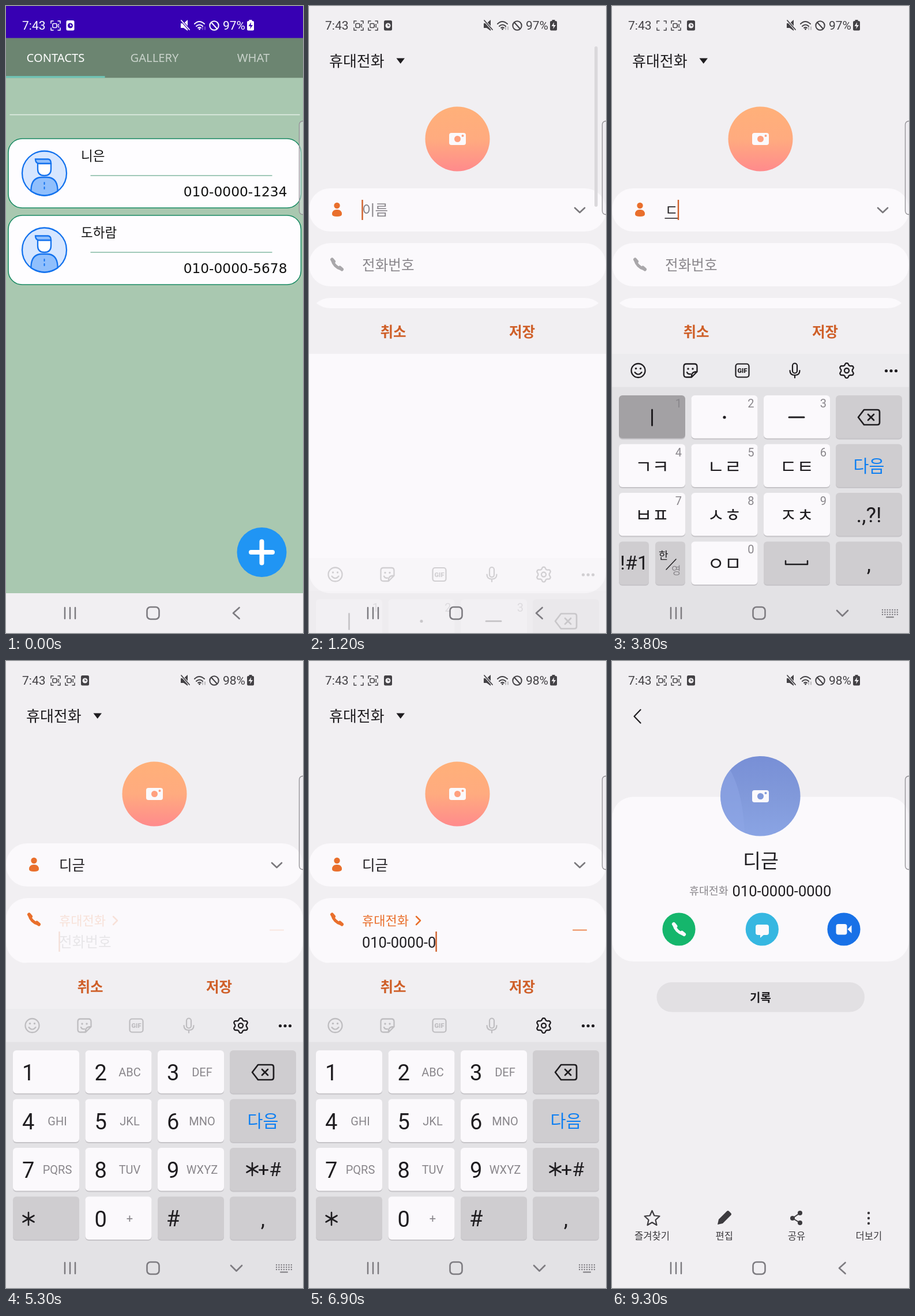
An HTML page for the animation above (9.4 s loop, 515 by 1087 pixels).

```html
<!DOCTYPE html>
<html lang="ko">
<head>
<meta charset="utf-8">
<title>Add a contact</title>
<style>
html, body { margin: 0; width: 100%; height: 100%; overflow: hidden; background: #f1eff2; }
svg { display: block; width: 515px; height: 1087px; }
text { font-family: Roboto, "Noto Sans CJK KR", "Noto Sans CJK", sans-serif; white-space: pre; }
.wide { font-family: "Noto Sans", "Noto Sans CJK KR", sans-serif; }
.round { font-family: "DejaVu Sans", sans-serif; }
.line { fill: none; stroke-linecap: round; stroke-linejoin: round; }
</style>
</head>
<body>
<svg id="stage" viewBox="0 0 515 1087"></svg>
<script>
const LOOP = 9400, STEP = 100;
const INK = '#1f1d20', GREY = '#89868b', PAPER = '#f1eff2', CARD = '#fbf9fc', ORANGE = '#e96f2c', RUST = '#cf5f28';
const NUMBER = '010-0000-0000';

// Drawing helpers
const text = (x, y, size, str, fill = INK, more = '') => `<text x="${x}" y="${y}" font-size="${size}" fill="${fill}" ${more}>${str}</text>`;
const mid = (x, y, size, str, fill, more = '') => text(x, y, size, str, fill, 'text-anchor="middle" ' + more);
const rect = (x, y, w, h, r, fill, more = '') => `<rect x="${x}" y="${y}" width="${w}" height="${h}" rx="${r}" fill="${fill}" ${more}/>`;
const circle = (x, y, r, fill, more = '') => `<circle cx="${x}" cy="${y}" r="${r}" fill="${fill}" ${more}/>`;
const line = (d, color = INK, w = 2.5, more = '') => `<path class="line" d="${d}" stroke="${color}" stroke-width="${w}" ${more}/>`;
const shape = (d, fill, more = '') => `<path d="${d}" fill="${fill}" ${more}/>`;
const group = (id, body, more = '') => `<g id="${id}" ${more}>${body}</g>`;
const at = (x, y, body) => `<g transform="translate(${x} ${y})">${body}</g>`;
const bold = 'font-weight="500"';

// Icons
const phone = (x, y, color, k = 1) => `<g transform="translate(${x} ${y}) scale(${k})">` +
  line('M-8 -7Q-5 4 7 8', color, 5) + line('M-8.5 -8.5L-5.5 -5', color, 6) + line('M5 5.5L8.5 8.5', color, 6) + '</g>';
const camera = (x, y, hole) => at(x, y, rect(-14.5, -10.5, 29, 21, 4, CARD) + circle(0, 0, 5.5, hole) + circle(9, -5.5, 2, hole));
const record = (x, id) => at(x, 34, line('M-8 -4V-8H-4M4 -8H8V-4M8 4V8H4M-4 8H-8V4', 'currentColor', 1.5) +
  group(id, '<rect x="-5" y="-3.5" width="7" height="7" rx="1.5" class="line" stroke="currentColor" stroke-width="1.5"/>' + line('M3 0L5.5 -3V3Z', 'currentColor', 1)));
const star = (x, y) => line([0, 1, 2].map(i => {
  const a = Math.PI / 2 + i * Math.PI / 3, u = 11 * Math.cos(a), v = 11 * Math.sin(a);
  return `M${x - u} ${y - v}L${x + u} ${y + v}`;
}).join(''), INK, 2.6);
const gear = Array.from({ length: 49 }, (_, i) => {
  const a = i * Math.PI / 24, r = 11.3 + 1.7 * Math.tanh(2 * Math.cos(6 * a));
  return (i ? 'L' : 'M') + (r * Math.sin(a)).toFixed(1) + ' ' + (r * Math.cos(a)).toFixed(1);
}).join('') + 'Z';

function statusBar() {
  return group('clockText', text(28, 41, 21, '7:43', 'currentColor')) + record(86, 'blink') +
    group('extra', record(111, 'steady')) +
    group('badge', rect(130, 25, 14, 17.5, 2.5, 'currentColor') + circle(137, 34, 4.5, 'var(--back)') + line('M137 32V34H139', 'currentColor', 1.3)) +
    shape('M303 30H308L315 24V43L308 38H303Z', 'currentColor') + line('M304 25L318 41', 'var(--back)', 4) + line('M304 25L318 41', 'currentColor', 1.8) +
    line('M327 31Q335 23 344 31M330 35Q335.500 30 341 35M333 38Q335.500 36 338 38', 'currentColor', 2) + circle(335.5, 40, 1.5, 'currentColor') +
    line('M341 41V36M345 36V41', 'currentColor', 1.2, 'opacity=".5"') +
    circle(361, 34, 7.7, 'none', 'stroke="currentColor" stroke-width="2"') + line('M356 28.500L366 39.500', 'currentColor', 2) +
    `<text id="charge" x="376" y="41" font-size="21" fill="currentColor"></text>` +
    rect(418, 26, 12, 16.5, 2, 'currentColor') + rect(421.5, 24, 5, 3, 0, 'currentColor') + shape('M425 28L420.500 35H424L423 40L428 33H424.500Z', 'var(--back)');
}

function contact(y, name, number) {
  const blue = '#1372ee', edge = `stroke="${blue}" stroke-width="2.3"`;
  return at(0, y, rect(4, 0, 507.5, 120, 24, '#fefdff', 'stroke="#188a63" stroke-width="1.6"') +
    circle(66.5, 60, 38.5, '#d6e6ff', edge) +
    shape('M43.500 91V87Q45 67 62 67H71Q88 67 89.500 87V91Q67 106 43.500 91Z', '#90bffc', edge) +
    shape('M55 43H78V53Q78 64 66.500 64T55 53Z', '#fff', edge) +
    shape('M51 35.500H73Q78 36 78 43H58Q51 43 51 35.500Z', '#90bffc', edge) +
    line('M66.500 76V79M66.500 84V87', blue, 2) +
    text(130, 38, 22.5, name, '#111', 'class="wide"') + line('M147 64H461', '#83b9a2', 1.5) +
    text(487.5, 100, 23.3, number, '#111', 'class="round" text-anchor="end"'));
}

function listScreen() {
  return rect(0, 0, 515, 1087, 0, '#a9c8b0') + rect(0, 0, 515, 56, 0, '#3700b3') + rect(0, 55.5, 515, 69, 0, '#6c8571') +
    rect(0, 121.5, 171.5, 3, 0, '#70c9bb') +
    [['CONTACTS', 86, '#fff'], ['GALLERY', 257.5, '#c8d2ca'], ['WHAT', 429, '#c8d2ca']].map(([s, x, c]) => mid(x, 97, 20.2, s, c, 'class="wide"')).join('') +
    line('M7 188.500H509', '#e3eee5', 1.6) +
    contact(230, '니은', '010-0000-1234') + contact(363, '도하람', '010-0000-5678') +
    circle(443.5, 947, 43, '#2095f4') + line('M425 947H462M443.500 928.500V965.500', '#fff', 8) +
    rect(0, 1018, 515, 69, 0, PAPER);
}

function formScreen() {
  const pill = (y, h, id = '') => rect(0, y, 515, h, 37, CARD, id);
  const lower = pill(506, 75) + rect(38, 535, 22, 17, 2, '#a9a7aa') + line('M39 537L49 545L59 537', CARD, 1.6) + text(92, 552, 24.5, '이메일', GREY) +
    pill(601, 75) + circle(45, 632, 5, '#a9a7aa') + circle(55, 633, 4, '#a9a7aa') + shape('M37 649Q36 639 45 639T54 649Z', '#a9a7aa') + shape('M55 649Q55 642 53 640Q61 638 61 648Z', '#a9a7aa') +
    text(92, 647, 24.5, '그룹', GREY) + line('M199 720L207 728L215 720', GREY, 2.5) + text(225, 730, 18.5, '항목 더보기', GREY, bold);
  return rect(0, 0, 515, 1200, 0, PAPER) + text(35, 105, 26, '휴대전화') + shape('M151.500 90.500H166L158.700 100Z', INK) +
    circle(257.5, 230.5, 56, 'url(#peach)') + camera(257.5, 230.5, '#ffa07f') +
    group('cards',
      pill(316, 75) + circle(48.5, 346, 5.2, ORANGE) + shape('M40 361Q40 353 48.500 353T57 361Q57 365 48.500 365T40 361Z', ORANGE) +
      line('M461 350L469.500 358L478 350', '#7b797d', 2.7) + `<text id="name" x="92" y="363" font-size="24.5"></text>` + line('M92 368H116', INK, 1.5, 'id="under"') +
      pill(411, 75, 'id="phoneCard"') + group('phoneGrey', phone(48.5, 448, '#a9a7aa')) + group('phoneHot', phone(48.5, 448, ORANGE)) +
      `<text id="hint" x="92" font-size="24.600" fill="${GREY}">전화번호</text>` +
      group('phoneLabel', text(92, 458, 22, '휴대전화', ORANGE, bold) + line('M186 443L193 450L186 457', ORANGE, 2.5) + line('M458 466.500H481', ORANGE, 2.2, 'opacity=".8"')) +
      `<text id="digits" x="92" y="496.500" font-size="25.400" fill="${INK}"></text>` +
      group('addRow', line('M29 524H486', '#e6e4e7', 1.2) + line('M38 562.500H59M48.500 552V573', '#a9a7aa', 2) + text(92, 571, 24.5, '전화번호 추가', GREY)) +
      group('lower', lower), 'clip-path="url(#window)"') +
    rect(91.3, 336, 2.4, 35, 0, RUST, 'id="caret"') +
    group('panel', rect(0, 560, 515, 458, 37, CARD) + rect(0, 524, 515, 79, 0, PAPER)) +
    group('buttons', rect(258, 531, 223, 68, 34, '#d5d1d2', 'id="saveBg"') + mid(146, 574, 24.5, '취소', RUST, 'font-weight="700"') + mid(369.5, 574, 24.5, '저장', RUST, 'font-weight="700"')) +
    rect(495, 70, 5.5, 278, 2.7, '#dad8db', 'id="scroll"');
}

const columns = [12, 137.5, 263, 388], rows = [675, 759.5, 844, 928.5];
function key(id, grey, x, y, w = 115) {
  return rect(x, y + 2, w, 74.5, 6, '#c6c4c8') + rect(x, y, w, 74.5, 6, grey ? '#cfcdd0' : CARD, `id="${id}"`);
}
function keyGrid(prefix) {
  let out = '';
  rows.forEach((y, r) => columns.forEach((x, c) => {
    const id = prefix + (r * 4 + c), last = r === 3;
    if (prefix === 'k' && last && !c) out += key(id, true, 12, y, 52) + key('lang', true, 75, y, 52);
    else out += key(id, c === 3 || (last && c !== 1), x, y);
  }));
  return out;
}
function hangulKeys() {
  const labels = ['', '', '', 'ㄱㅋ', 'ㄴㄹ', 'ㄷㅌ', 'ㅂㅍ', 'ㅅㅎ', 'ㅈㅊ'];
  return keyGrid('k') + labels.map((s, i) => {
    const x = columns[i % 3], y = rows[Math.floor(i / 3)];
    return mid(x + 57.5, y + 50, 32, s, INK, bold) + text(x + 109, y + 21, 20, i + 1, GREY, 'text-anchor="end"');
  }).join('') + line('M69.500 700V727M307 713H333', INK, 3) + circle(195, 713, 2.6, INK) +
    mid(195, 978, 32, 'ㅇㅁ', INK, bold) + text(246.5, 949, 20, '0', GREY, 'text-anchor="end"') +
    mid(38.5, 977, 34, '!#1') + text(81, 959, 18, '한') + text(103, 985, 18, '영', GREY) + line('M94 977L111 959', INK, 1.5) +
    line('M301 962V968H339V962', INK, 2.5) + mid(445.5, 895, 37, '.,?!');
}
function numberKeys() {
  const letters = ['', 'ABC', 'DEF', 'GHI', 'JKL', 'MNO', 'PQRS', 'TUV', 'WXYZ'];
  return keyGrid('n') + letters.map((s, i) => {
    const x = columns[i % 3], y = rows[Math.floor(i / 3)];
    return text(x + 16, y + 52, 38, i + 1) + mid(x + 77, y + 45, 20, s, GREY);
  }).join('') + star(39, 967) + text(153.5, 980.5, 38, '0') + mid(214.5, 973, 20, '+', GREY) + text(278, 980, 38, '#') +
    star(427, 881) + mid(457, 893, 34, '+#');
}
function keyboard() {
  const icons = at(45.5, 632, circle(0, 0, 12, 'none', `stroke="${INK}" stroke-width="2.300"`) + circle(-4, -3.5, 1.7, INK) + circle(4, -3.5, 1.7, INK) + line('M-6 3Q0 10 6 3', INK, 2.2)) +
    at(136, 632, line('M-7 -11.500H7Q11.500 -11.500 11.500 -7V2L2 11.500H-7Q-11.500 11.500 -11.500 7V-7Q-11.500 -11.500 -7 -11.500ZM2 11Q1 2 11 2M-6 3Q-4 7 0 6', INK, 2.3) + circle(-4, -3, 1.7, INK) + circle(4, -3, 1.7, INK)) +
    at(226, 632, rect(-11.5, -11.5, 23, 23, 4, 'none', `stroke="${INK}" stroke-width="2.200"`) + mid(0, 4, 11, 'GIF', INK, 'font-weight="900"')) +
    at(317, 632, rect(-4, -12.5, 8, 17, 4, 'none', `stroke="${INK}" stroke-width="2.200"`) + line('M-8.500 0Q-8.500 8 0 8T8.500 0M0 8V12.500', INK, 2.2));
  return rect(0, 603.5, 515, 500, 0, '#e3e2e5') + rect(0, 603.5, 515, 57, 0, '#ecebee') + group('tools', icons) +
    at(407, 632, line(gear, INK, 2.3) + circle(0, 0, 4, 'none', `stroke="${INK}" stroke-width="2.300"`)) +
    [475.5, 484, 492.5].map(x => circle(x, 632.5, 2.6, INK)).join('') +
    group('hangul', hangulKeys()) + group('numeric', numberKeys()) +
    line('M437 700H460Q464 700 464 704V722Q464 726 460 726H437L427 713ZM444 708L454 718M454 708L444 718', INK, 2.7) +
    mid(445.5, 808, 29.3, '다음', '#0d7ff2') + mid(445.5, 980, 37, ',');
}

function detailScreen() {
  const dark = '#3d3b3f';
  return rect(0, 0, 515, 1087, 0, PAPER) + line('M49.500 84.500L38.500 96L49.500 107.500', INK, 2.2) + rect(0, 235.5, 515, 285.5, 37, CARD) +
    circle(257.3, 234.3, 69.3, 'url(#sky)') + shape('M205 189Q227 229 230 298A69.300 69.300 0 0 1 205 189Z', '#90a8e8', 'opacity=".5"') + camera(257.5, 234.5, '#8199da') +
    mid(258, 359, 33.7, '디귿') + text(134, 405, 18.4, '휴대전화', GREY) + text(208.5, 407.5, 25.5, NUMBER) +
    circle(116, 465, 28.6, '#15b66c') + phone(116, 465, CARD, 1.05) +
    circle(260.3, 465, 28.6, '#36b7e1') + rect(249, 457, 23, 18, 4, CARD) + shape('M257 474V480L264 474Z', CARD) +
    circle(402, 465, 28.6, '#1871e7') + rect(388.5, 456, 19, 18.5, 4, CARD) + shape('M408.500 465L415.500 458V472Z', CARD) +
    rect(77.5, 557, 360.5, 51.5, 25.7, '#e2e0e3') + mid(257.5, 591, 20, '기록', INK, 'font-weight="700"') +
    line('M69.500 953L73.300 961.500L82.500 962.500L75.500 969L77.500 978L69.500 973.300L61.500 978L63.500 969L56.500 962.500L65.700 961.500Z', dark, 2.2) +
    shape('M183 977L185 968L199 954Q201 952 203 954L206 957Q208 959 206 961L192 975Z', dark) +
    line('M326 957L313 966L326 974', dark, 2) + circle(326, 957, 4, dark) + circle(313, 966, 4, dark) + circle(326, 974, 4, dark) +
    [957, 966, 975].map(y => circle(445, y, 2.2, dark)).join('') +
    ['즐겨찾기', '편집', '공유', '더보기'].map((s, i) => mid(69.5 + i * 125.3, 1003, 16.6, s, dark)).join('');
}

function navBar() {
  const c = '#7d7b80';
  return line('M102 1043V1062M111 1043V1062M120 1043V1062', c, 2.5) + rect(244.5, 1042, 21, 21, 6, 'none', `stroke="${c}" stroke-width="2.600"`) +
    line('M404.500 1043L394 1052.500L404.500 1062', c, 2.7, 'id="back"') +
    group('hide', line('M390 1048L399.500 1057.500L409 1048', c, 2.7) +
      [1047, 1051, 1055].map(y => line(`M469 ${y}H495`, c, 2.3, 'stroke-dasharray="0.1 4.200"')).join('') + line('M476 1059.500H488', c, 2));
}

const gradient = (id, a, b, c) => `<linearGradient id="${id}" x2="0" y2="1"><stop stop-color="${a}"/><stop offset=".5" stop-color="${b}"/><stop offset="1" stop-color="${c}"/></linearGradient>`;
document.getElementById('stage').innerHTML =
  `<defs>${gradient('peach', '#ffb079', '#ffab7f', '#ff8a8c')}${gradient('sky', '#788fd6', '#8199da', '#8aa4e4')}
  <clipPath id="window"><rect id="windowBox" y="200" width="515" rx="37"/></clipPath></defs>` +
  group('list', listScreen()) + group('form', formScreen()) + group('keys', keyboard()) +
  rect(0, 1083.5, 515, 4, 0, '#69676b', 'id="seam"') + group('detail', detailScreen()) +
  group('status', statusBar()) + group('nav', navBar()) +
  rect(508.5, 199.5, 20, 162, 6, '#e9e7ea', 'fill-opacity=".4" stroke="#929095" stroke-width="1.300"');

// Timeline
const ui = {};
document.querySelectorAll('[id]').forEach(el => ui[el.id] = el);
const clamp = v => Math.min(1, Math.max(0, v));
const span = (t, a, b) => clamp((t - a) / (b - a));
const easeInOut = p => p < .5 ? 4 * p ** 3 : 1 - 4 * (1 - p) ** 3;
const show = (el, on) => el.style.display = on ? '' : 'none';
const set = (el, attrs) => Object.entries(attrs).forEach(([k, v]) => el.setAttribute(k, v));
const shift = (el, y) => set(el, { transform: `translate(0 ${y.toFixed(2)})` });
const latest = (t, steps) => steps.reduce((value, [start, next]) => t >= start ? next : value, '');

const nameSteps = [[3700, 'ㄷ'], [3900, '디'], [4100, '디ㄱ'], [4300, '디그'], [4500, '디귿']];
const digitTimes = [5700, 5850, 6000, ...Array.from({ length: 8 }, (_, i) => 6150 + i * 174)];
const presses = [[3600, 'k6'], [3800, 'k0'], [4000, 'k4'], [4200, 'k2'], [4400, 'k6'], [4600, 'k7'],
  ...digitTimes.map((time, i) => [time - 100, i === 1 ? 'n0' : 'n13'])];
const restColors = Object.fromEntries([...new Set(presses.map(p => p[1]))].map(id => [id, ui[id].getAttribute('fill')]));

function typedNumber(t) {
  const n = digitTimes.filter(time => t >= time).length;
  return NUMBER.slice(0, n + (n > 3) + (n > 7));
}

function render(t) {
  const typing = t >= 1100 && t < 7900, inPhone = t >= 4700;
  const enter = span(t, 550, 1000), leave = span(t, 8050, 8600);
  const blinkOn = t < 100 || Math.floor((t - 100) / 500) % 2 === 0;

  // Screen changes
  show(ui.list, t < 1000);
  show(ui.form, t >= 600 && t < 8600);
  shift(ui.form, 250 * (1 - enter) ** 3 - 11 * (1 - (1 - leave) ** 3));
  set(ui.form, { opacity: span(t, 550, 800) });
  show(ui.seam, t >= 8100 && t < 8300);
  show(ui.detail, t >= 8100);
  shift(ui.detail, 251 * (1 - leave) ** 3);
  set(ui.detail, { opacity: t < 8200 ? .48 : span(t, 8000, 8300) });

  // Status and navigation
  const purple = t < 750;
  ui.status.style.color = purple ? '#fff' : '#434145';
  ui.status.style.setProperty('--back', purple ? '#3700b3' : PAPER);
  show(ui.blink, blinkOn);
  show(ui.extra, t >= 200);
  shift(ui.badge, 0);
  ui.badge.setAttribute('transform', `translate(${t < 200 ? -25.5 : 0} 0)`);
  ui.charge.textContent = t < 4600 ? '97%' : '98%';
  const shown = t >= 1300 && t < 7900;
  show(ui.back, !shown);
  show(ui.hide, shown);

  // Form
  const grow = 114 * easeInOut(span(t, 4700, 5200)), reveal = span(t, 5250, 5550);
  const name = latest(t, nameSteps), digits = typedNumber(t);
  set(ui.windowBox, { height: (typing ? 524 : 920) - 200 });
  show(ui.panel, typing);
  shift(ui.buttons, typing ? 0 : 414);
  show(ui.saveBg, t >= 7900);
  set(ui.scroll, { opacity: t < 1000 ? 0 : 1 - span(t, 2400, 2700) });
  ui.name.textContent = name || '이름';
  set(ui.name, { fill: name ? INK : GREY });
  show(ui.under, name && t < 4600);
  const start = 92 + 22.5 * Math.max(0, name.length - 1);
  set(ui.under, { d: `M${start} 368H${start + 23}` });
  set(ui.phoneCard, { height: 75 + grow });
  shift(ui.lower, grow);
  show(ui.phoneGrey, !inPhone);
  show(ui.phoneHot, inPhone);
  show(ui.addRow, grow > 60);
  set(ui.phoneLabel, { opacity: reveal });
  show(ui.hint, !digits);
  set(ui.hint, { y: inPhone ? 496 : 458, opacity: inPhone ? reveal : 1 });
  ui.digits.textContent = digits;

  // Text cursor
  const width = [...digits].reduce((sum, c) => sum + (c === '-' ? 7 : 14.26), 0);
  const busy = t >= 3600;
  show(ui.caret, typing && (busy || blinkOn));
  set(ui.caret, inPhone ? { x: 91.3 + width, y: 469, opacity: reveal } : { x: 91.3 + 22.5 * name.length, y: 336, opacity: 1 });

  // Keyboard
  const rise = easeInOut(span(t, 1100, 1400));
  show(ui.keys, typing);
  shift(ui.keys, 415 * (1 - rise));
  set(ui.keys, { opacity: clamp(rise * 1.25) });
  show(ui.hangul, !inPhone);
  show(ui.numeric, inPhone);
  set(ui.tools, { opacity: inPhone ? .22 : 1 });
  const down = presses.filter(([time]) => t >= time && t < time + 100).map(p => p[1]);
  for (const id in restColors) set(ui[id], { fill: down.includes(id) ? '#a3a1a4' : restColors[id] });
}

const begin = performance.now();
function tick() {
  const t = (performance.now() - begin) % LOOP;
  render(Math.floor(t / STEP) * STEP);
  requestAnimationFrame(tick);
}
tick();
</script>
</body>
</html>
```
